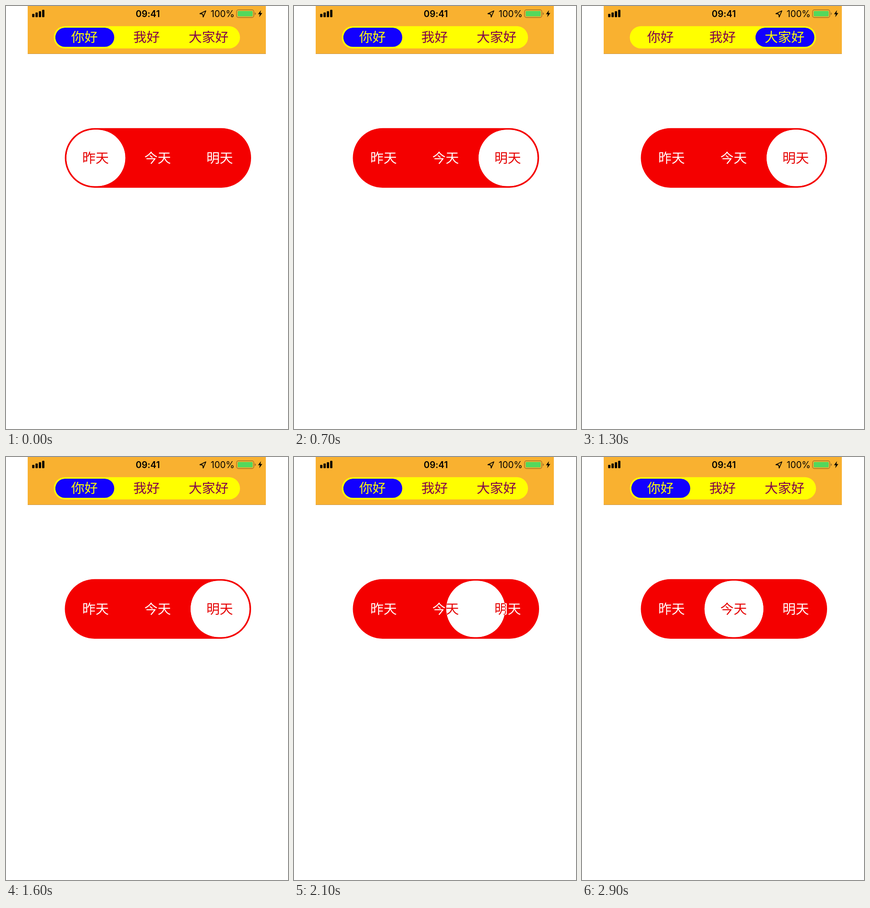
An HTML page for the animation above (3000 ms loop, 611 by 917 pixels).

```html
<!DOCTYPE html>
<html lang="zh">
<head>
<meta charset="utf-8">
<style>
  html, body { margin: 0; width: 100%; height: 100%; overflow: hidden; background: #fff; }
  svg { display: block; }
  .label { font: 300 28.8px "Noto Sans CJK SC", "Noto Sans CJK", sans-serif; text-anchor: middle; }
  .status { font-family: Inter, sans-serif; font-size: 19.5px; }
</style>
</head>
<body>
<svg id="stage" width="611" height="917" viewBox="0 0 611 917">
  <rect x="47" width="516" height="104" fill="#f9b130"/>
  <rect x="47" y="103" width="516" height="1" fill="#c9974a"/>
  <g id="signal"></g>
  <text class="status" x="281" y="23.5" font-weight="600" letter-spacing=".1">09:41</text>
  <path d="M433 10.5 420 16.7 426.2 17.7 427.3 24Z" fill="none" stroke="#000" stroke-width="1.7" stroke-linejoin="round"/>
  <text class="status" x="443.5" y="23.5">100%</text>
  <rect x="499.5" y="8.2" width="37.5" height="16.8" rx="4" fill="none" stroke="#a0742a" stroke-width="1.4"/>
  <rect x="502" y="10.8" width="32.5" height="11.6" rx="1.5" fill="#53d85c"/>
  <path d="M539 13.7q2.4 .8 2.4 2.9t-2.4 2.9z" fill="#a0742a"/>
  <path d="M552.5 9 546 17.7H550L548.6 24.2 555.3 15.2H551.2Z"/>
</svg>
<script>
const stage = document.getElementById('stage');
const PITCH = 134.5, PAD = 3.25, LOOP = 3000, STEP = 100;

function add(parent, tag, attrs, text = '') {
  const el = document.createElementNS('http://www.w3.org/2000/svg', tag);
  for (const key in attrs) el.setAttribute(key, attrs[key]);
  el.textContent = text;
  parent.append(el);
  return el;
}

// Segmented switch; labels change colour where the knob covers them.
function makeSwitch(id, x, y, h, labels, track, knob, plain, lit) {
  const knobBox = { x: x + PAD, y: y + PAD, width: PITCH - 2 * PAD, height: h - 2 * PAD, rx: h / 2 - PAD };
  const write = (parent, fill) => labels.forEach((label, i) =>
    add(parent, 'text', { class: 'label', x: x + PITCH * (i + .5) - .8, y: y + h / 2 + 10.3, fill }, label));

  add(stage, 'rect', { x, y, width: PITCH * 3, height: h, rx: h / 2, fill: track });
  write(stage, plain);
  const clip = add(stage, 'clipPath', { id });
  const hole = add(clip, 'rect', knobBox);
  const front = add(stage, 'g', { 'clip-path': `url(#${id})` });
  const disc = add(front, 'rect', { ...knobBox, fill: knob });
  write(front, lit);

  return pos => [hole, disc].forEach(el => el.setAttribute('x', x + PAD + pos * PITCH));
}

for (let i = 0; i < 4; i++)
  add(document.getElementById('signal'), 'rect',
    { x: 56.7 + i * 7.2, y: 17 - i * 2.9, width: 4.9, height: 7.3 + i * 2.9, rx: 1.3 });

const setTop = makeSwitch('top', 103.5, 43.7, 48.4, ['你好', '我好', '大家好'],
  '#ffff00', '#1200ff', '#80004d', '#ffff00');
const setDay = makeSwitch('day', 127.5, 264.7, 129.2, ['昨天', '今天', '明天'],
  '#f40000', '#fff', '#fff', '#e60000');

// Eased move by `delta` segments starting at `start`.
function move(t, start, delta) {
  const u = Math.min(1, Math.max(0, (t - start) / 300));
  return delta * (1 - Math.cos(Math.PI * u)) / 2;
}

function draw() {
  const t = Math.floor(performance.now() % LOOP / STEP) * STEP;
  setDay(move(t, 282, 2) + move(t, 1946, -1));
  setTop(move(t, 850, 2) + move(t, 1300, -2));
  requestAnimationFrame(draw);
}
draw();
</script>
</body>
</html>
```
